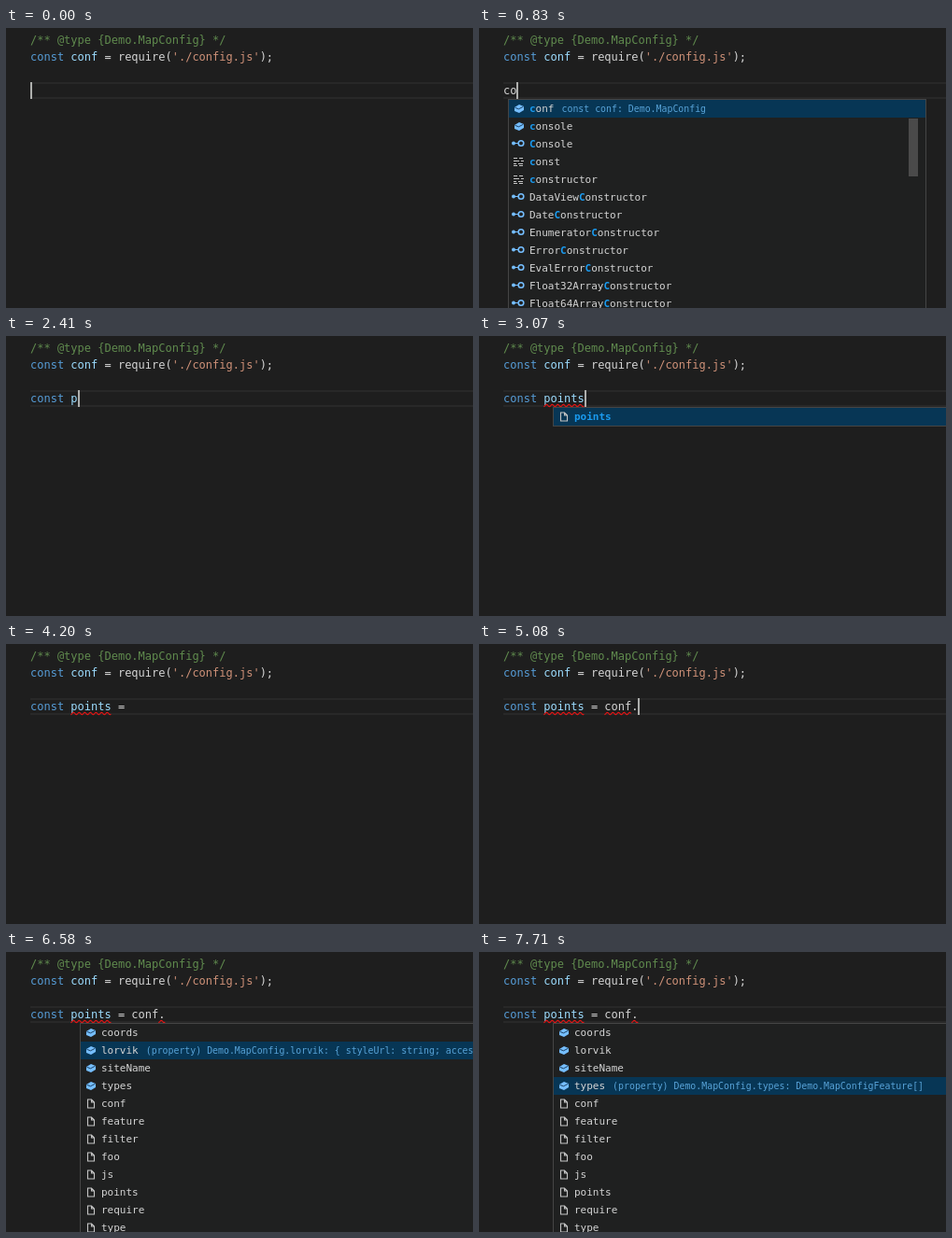
An HTML page with a canvas for the animation above (8 s loop, 500 by 300 pixels).

```html
<!DOCTYPE html>
<html lang="en">
<head>
<meta charset="utf-8">
<title>Editor completion</title>
<style>
html, body { margin: 0; width: 100%; height: 100%; overflow: hidden; background: #1e1e1e; }
canvas { display: block; }
</style>
</head>
<body>
<canvas id="stage" width="500" height="300"></canvas>
<script>
const ctx = document.getElementById('stage').getContext('2d');
const LOOP = 8000, LEFT = 26, CHAR = 7.224, ROW = 19;
const MONO = '"DejaVu Sans Mono", monospace';
const BLUE = '#569cd6', NAME = '#9cdcfe', PLAIN = '#d4d4d4';

// Each entry: kind (v variable, i interface, k keyword, w word) and label.
const globals = ('v conf|v console|i Console|k const|k constructor|i DataViewConstructor|' +
  'i DateConstructor|i EnumeratorConstructor|i ErrorConstructor|i EvalErrorConstructor|' +
  'i Float32ArrayConstructor|i Float64ArrayConstructor|i FunctionConstructor|' +
  'w points|w type').split('|');
const members = ('v coords|v lorvik|v siteName|v types|w conf|w feature|w filter|w foo|' +
  'w js|w points|w require|w type').split('|');
const details = {
  conf: 'const conf: Demo.MapConfig',
  console: 'var console: Console',
  coords: '(property) Demo.MapConfig.coords: number[]',
  lorvik: '(property) Demo.MapConfig.lorvik: { styleUrl: string; accessToken: string; }',
  siteName: '(property) Demo.MapConfig.siteName: string',
  types: '(property) Demo.MapConfig.types: Demo.MapConfigFeature[]'
};

// Each step changes part of the state. query null means no popup;
// err is a [first column, length] list of underlined ranges.
const POINTS = [6, 6];
const decl = 'const points = ';
const steps = [
  [0, { text: '', cursor: true, query: null, at: 0, sel: 0, detail: true, err: [] }],
  [110, { cursor: false }],
  [530, { text: 'c', cursor: true }],
  [600, { query: 'c', at: 1, detail: false }],
  [680, { detail: true }],
  [760, { text: 'co' }],
  [840, { query: 'co', at: 2 }],
  [920, { err: [[0, 2]] }],
  [1010, { cursor: true }],
  [1280, { text: 'con', err: [[0, 3]] }],
  [1340, { query: 'con', at: 3 }],
  [1460, { text: 'cons', err: [[0, 4]] }],
  [1640, { query: 'cons', at: 4 }],
  [1690, { text: 'const', query: 'const', at: 5, err: [] }],
  [1750, { query: null }],
  [1810, { text: 'const ' }],
  [2290, { cursor: false }],
  [2410, { text: 'const p', cursor: true }],
  [2470, { query: 'p', at: 7 }],
  [2650, { text: 'const po', query: 'po', at: 8 }],
  [2730, { text: 'const poi', query: 'poi' }],
  [2820, { text: 'const poin', query: 'poin' }],
  [2900, { text: 'const point', query: 'point' }],
  [2990, { text: 'const points', query: 'points' }],
  [3070, { err: [POINTS] }],
  [3420, { text: 'const points ', query: null }],
  [3600, { text: 'const points =' }],
  [3720, { text: decl }],
  [4200, { cursor: false }],
  [4490, { text: decl + 'c', cursor: true }],
  [4570, { query: 'c', at: 16 }],
  [4650, { text: decl + 'co', query: 'co' }],
  [4740, { text: decl + 'con', query: 'con' }],
  [4820, { text: decl + 'conf', query: 'conf' }],
  [4900, { err: [POINTS, [15, 4]] }],
  [5080, { text: decl + 'conf.', query: null }],
  [5140, { query: '', at: 20, detail: false }],
  [5200, { detail: true, err: [POINTS, [19, 1]] }],
  [5620, { cursor: false }],
  [6100, { cursor: true }],
  [6340, { sel: 1, detail: false }],
  [6400, { detail: true }],
  [6580, { cursor: false }],
  [6880, { sel: 2 }],
  [7120, { cursor: true }],
  [7600, { cursor: false }],
  [7660, { sel: 3, detail: false }],
  [7710, { detail: true }]
];

const column = n => LEFT + n * CHAR;

function box(x, y, w, h, color) {
  ctx.fillStyle = color;
  ctx.fillRect(x, y, w, h);
}

// Draws [text, color, weight] runs one after another and returns the end.
function runs(parts, x, y, size) {
  for (const [text, color, weight = 'normal'] of parts) {
    ctx.font = `${weight} ${size}px ${MONO}`;
    ctx.fillStyle = color;
    ctx.fillText(text, x, y);
    x += ctx.measureText(text).width;
  }
  return x;
}

function poly(points, color) {
  ctx.beginPath();
  points.forEach(([x, y]) => ctx.lineTo(x, y));
  ctx.closePath();
  ctx.fillStyle = color;
  ctx.fill();
}

function squiggle([start, length]) {
  const x0 = column(start), x1 = column(start + length);
  ctx.beginPath();
  for (let x = x0; x <= x1; x += 0.5) {
    ctx.lineTo(x, 74.5 + 1.1 * Math.cos((x - x0) * Math.PI / 3));
  }
  ctx.strokeStyle = '#e51414';
  ctx.lineWidth = 1.1;
  ctx.stroke();
}

const icons = {
  v() {
    poly([[7, 8], [12, 5], [17, 7], [17, 11], [12, 14], [7, 12]], '#75beff');
    ctx.beginPath();
    ctx.moveTo(7.5, 8.3);
    ctx.lineTo(11.5, 9.8);
    ctx.lineTo(16.5, 7.2);
    ctx.strokeStyle = '#1d4263';
    ctx.lineWidth = 1;
    ctx.stroke();
  },
  i() {
    ctx.fillStyle = ctx.strokeStyle = '#75beff';
    ctx.beginPath();
    ctx.arc(6, 8.5, 2, 0, 7);
    ctx.fill();
    ctx.fillRect(7, 8, 4, 1);
    ctx.lineWidth = 1.6;
    ctx.beginPath();
    ctx.arc(14, 8.5, 2.8, 0, 7);
    ctx.stroke();
  },
  k() {
    const bars = [[6, 5, 4], [12, 5, 4], [6, 8, 6], [14, 8, 3], [6, 11, 3], [11, 11, 5], [6, 13, 4], [12, 13, 4]];
    bars.forEach(([x, y, w]) => box(x, y, w, 1, '#c5c5c5'));
  },
  w() {
    ctx.strokeStyle = '#c5c5c5';
    ctx.lineWidth = 1.1;
    ctx.beginPath();
    [[8.5, 5], [12.5, 5], [15.5, 8], [15.5, 14], [8.5, 14]].forEach(p => ctx.lineTo(...p));
    ctx.closePath();
    ctx.moveTo(12.5, 5);
    ctx.lineTo(12.5, 8);
    ctx.lineTo(15.5, 8);
    ctx.stroke();
  }
};

function popup({ query, at, sel, detail }) {
  const hit = label => label.toLowerCase().indexOf(query);
  const list = query === '' ? members : globals.filter(item => hit(item.slice(2)) >= 0);
  const x = Math.min(79, Math.round(column(at) - 2));
  const width = 448, height = list.length * ROW + 2;
  box(x, 76, width, height, '#454545');
  box(x + 1, 77, width - 2, height - 2, '#1f2020');

  list.slice(0, 12).forEach((item, n) => {
    const y = 77 + n * ROW, label = item.slice(2);
    if (n === sel) box(x + 1, y, width - 2, ROW, '#073655');
    ctx.save();
    ctx.translate(x, y);
    icons[item[0]]();
    ctx.restore();
    const from = hit(label), to = from + query.length;
    const end = runs([
      [label.slice(0, from), PLAIN],
      [label.slice(from, to), '#1a9bf0', 'bold'],
      [label.slice(to), PLAIN]
    ], x + 23, y + 12.5, 11);
    if (n === sel && detail && details[label]) {
      runs([[details[label], '#58a3d8']], end + 8, y + 12.5, 9.9);
    }
  });
  if (list.length > 11) box(x + 429, 97, 10, 62, '#4a4a4a');
}

function draw(time) {
  const state = {};
  for (const [start, change] of steps) {
    if (start <= time) Object.assign(state, change);
  }
  box(0, 0, 500, 300, '#1e1e1e');
  box(LEFT, 58, 474, 2, '#282828');
  box(LEFT, 74, 474, 2, '#282828');

  runs([['/** @type {Demo.MapConfig} */', '#608b4e']], LEFT, 17, 12);
  runs([
    ['const', BLUE], [' conf', NAME], [' = require(', PLAIN],
    ["'./config.js'", '#ce9178'], [');', PLAIN]
  ], LEFT, 35, 12);
  const [, key = '', name = '', rest] = state.text.match(/^(const\b)?( \w+)?(.*)/);
  runs([[key, BLUE], [name, NAME], [rest, PLAIN]], LEFT, 71, 12);

  state.err.forEach(squiggle);
  if (state.cursor) box(Math.round(column(state.text.length)), 58, 2, 18, '#aeafad');
  if (state.query !== null) popup(state);
}

const begin = performance.now();
function frame() {
  draw((performance.now() - begin) % LOOP);
  requestAnimationFrame(frame);
}
frame();
</script>
</body>
</html>
```
